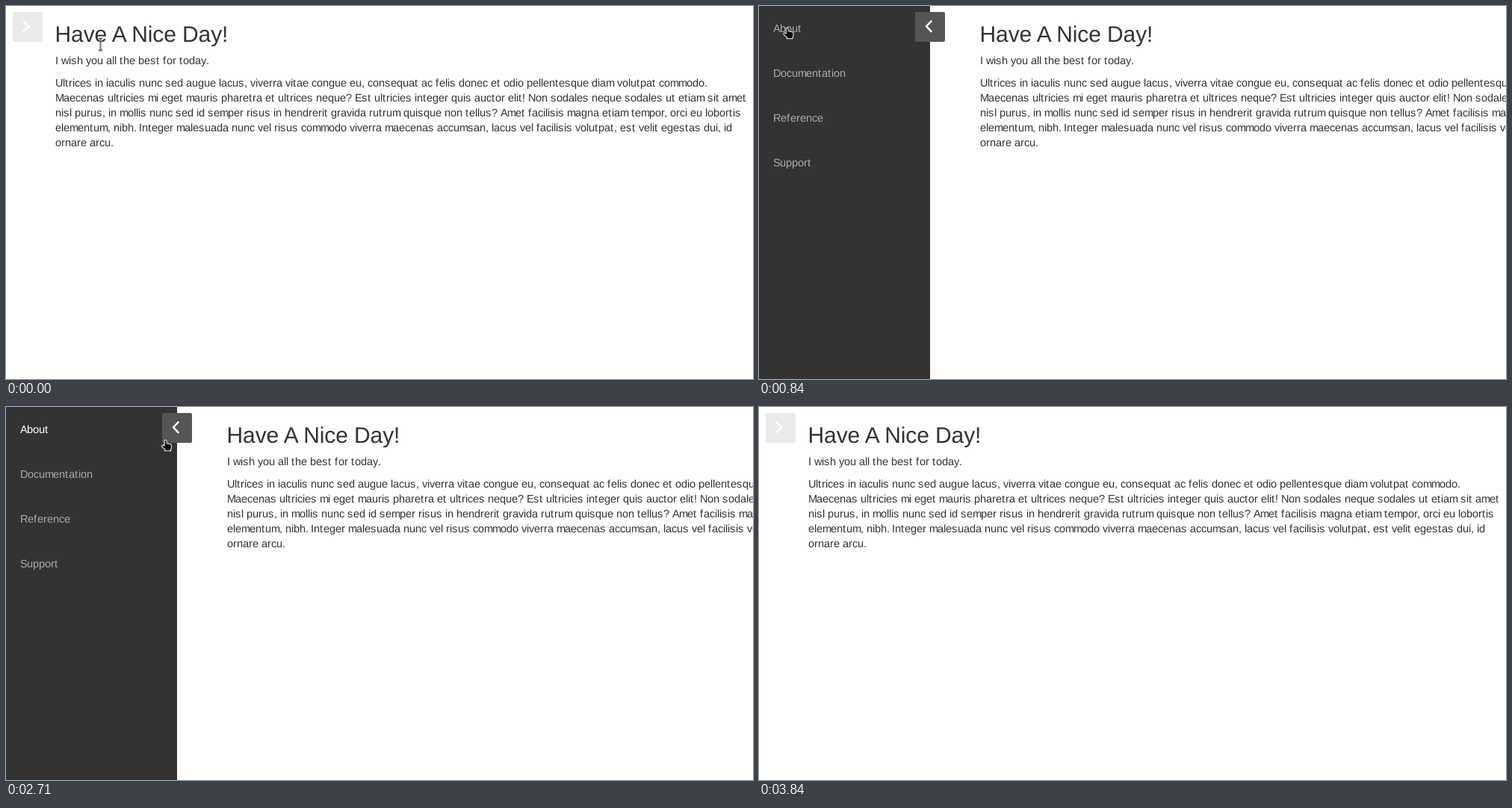
An HTML page that plays this animation: 1000x500 px, repeating every 4750 ms.

```html
<!DOCTYPE html>
<html lang="en">
<head>
<meta charset="utf-8">
<title>Sliding sidebar</title>
<style>
  html, body { margin: 0; width: 100%; height: 100%; overflow: hidden; background: #fff; }
  svg { display: block; width: 1000px; height: 500px; }
  text { font: 14.6px "Liberation Sans", Arial, sans-serif; fill: #333; text-rendering: geometricPrecision; }
  .title { font-size: 30px; letter-spacing: -.1px; }
  .menu text { fill: #aaa; }

  .page, .menu, .toggle, .plate, .chev, .menu text, .cursor, .cursor g {
    animation: 4.75s linear infinite;
  }
  .page { animation-name: page; animation-timing-function: step-end; }
  .menu { animation-name: menu; }
  .toggle { animation-name: toggle; }
  .plate { animation-name: plate; }
  .chev { fill: none; stroke: #fff; stroke-width: 2.4; animation-timing-function: step-end; }
  .chev.right { animation-name: closed; }
  .chev.left { animation-name: opened; }
  .menu .about { animation-name: about; }
  .menu .docs { animation-name: docs; }
  .menu .ref { animation-name: ref; }
  .menu .support { animation-name: support; }
  .cursor { animation-name: travel; }
  .cursor g { animation-timing-function: step-end; }
  .cursor .beam { animation-name: beam; }
  .cursor .hand { animation-name: hand; }
  .cursor .arrow { animation-name: arrow; }

  @keyframes page {
    0%, 65.47% { transform: translateX(0); }
    11.367% { transform: translateX(230px); }
  }
  @keyframes menu {
    0%, 69.16%, 100% { transform: translateX(-229px); }
    11.5% { transform: translateX(-229px); animation-timing-function: ease; }
    15.18% { transform: translateX(0); }
    65.47% { transform: translateX(0); animation-timing-function: ease; }
  }
  @keyframes toggle {
    0%, 65.47%, 100% { transform: translateX(0); }
    11.5% { transform: translateX(0); animation-timing-function: ease; }
    15.18%, 65.469% { transform: translateX(200px); }
  }
  @keyframes plate {
    0%, 2.9%, 65.47%, 100% { fill: #eaeaea; }
    5.6%, 11.5% { fill: #777; }
    15.18%, 65.469% { fill: #555; }
  }
  @keyframes closed {
    0%, 65.47% { opacity: 1; }
    11.367% { opacity: 0; }
  }
  @keyframes opened {
    0%, 65.47% { opacity: 0; }
    11.367% { opacity: 1; }
  }

  @keyframes about {
    0%, 22.5%, 26%, 46.3%, 61%, 100% { fill: #aaa; }
    23.5%, 24.5%, 47.5%, 58.9% { fill: #fff; }
  }
  @keyframes docs {
    0%, 24.5%, 28.5%, 44.2%, 47.8%, 100% { fill: #aaa; }
    25.5%, 27%, 45%, 46.3% { fill: #fff; }
  }
  @keyframes ref {
    0%, 27.2%, 31.5%, 41.5%, 45.5%, 100% { fill: #aaa; }
    28.2%, 30%, 42.5%, 44.2% { fill: #fff; }
  }
  @keyframes support {
    0%, 31.5%, 43%, 100% { fill: #aaa; }
    35%, 41.4% { fill: #fff; }
  }

  @keyframes travel {
    0%, .4% { transform: translate(126.5px, 51.5px); }
    3.6%, 22.5% { transform: translate(37.5px, 30px); }
    27.5% { transform: translate(62px, 112px); }
    32.84%, 34.1% { transform: translate(86px, 191px); }
    36.42%, 39.58% { transform: translate(100px, 223px); }
    41.26% { transform: translate(112.5px, 155px); }
    45% { transform: translate(129px, 75px); }
    49.9%, 51.16% { transform: translate(124px, 44px); }
    57.05% { transform: translate(213px, 45px); }
    61.26%, 69.47% { transform: translate(226px, 43px); }
    75.79% { transform: translate(338px, 227px); }
    80%, 100% { transform: translate(931px, 465px); }
  }
  @keyframes beam {
    0%, 65.47% { opacity: 1; }
    2.9%, 74.6% { opacity: 0; }
  }
  @keyframes hand {
    0%, 65.47% { opacity: 0; }
    2.9% { opacity: 1; }
  }
  @keyframes arrow {
    0%, 80.84% { opacity: 0; }
    74.6% { opacity: 1; }
  }
</style>
</head>
<body>
<svg viewBox="0 0 1000 500">
  <g class="page">
    <text class="title" x="65.5" y="48">Have A Nice Day!</text>
    <text class="fit" x="66" y="78">I wish you all the best for today.</text>
    <text class="fit" x="66" y="108">Ultrices in iaculis nunc sed augue lacus, viverra vitae congue eu, consequat ac felis donec et odio pellentesque diam volutpat commodo.</text>
    <text class="fit" x="66" y="128">Maecenas ultricies mi eget mauris pharetra et ultrices neque? Est ultricies integer quis auctor elit! Non sodales neque sodales ut etiam sit amet</text>
    <text class="fit" x="66" y="148">nisl purus, in mollis nunc sed id semper risus in hendrerit gravida rutrum quisque non tellus? Amet facilisis magna etiam tempor, orci eu lobortis</text>
    <text class="fit" x="66" y="168">elementum, nibh. Integer malesuada nunc vel risus commodo viverra maecenas accumsan, lacus vel facilisis volutpat, est velit egestas dui, id</text>
    <text class="fit" x="66" y="188">ornare arcu.</text>
  </g>

  <g class="menu">
    <rect width="229" height="500" fill="#333"/>
    <text class="fit about" x="19" y="35">About</text>
    <text class="fit docs" x="19" y="95">Documentation</text>
    <text class="fit ref" x="19" y="155">Reference</text>
    <text class="fit support" x="19" y="215">Support</text>
  </g>

  <g class="toggle">
    <rect class="plate" x="9" y="8" width="40" height="40" rx="2"/>
    <path class="chev right" d="M23 20 L30.7 27.2 L23 34.4"/>
    <path class="chev left" d="M31.3 19.6 L24 27.2 L31.3 34.8"/>
  </g>

  <g class="cursor">
    <g class="beam" fill="none">
      <path d="M-3 -8 H-1 L0 -7 L1 -8 H3 M0 -7 V7 M-3 8 H-1 L0 7 L1 8 H3" stroke="#fff" stroke-width="2.6"/>
      <path d="M-3 -8 H-1 L0 -7 L1 -8 H3 M0 -7 V7 M-3 8 H-1 L0 7 L1 8 H3" stroke="#000" stroke-width="1.1"/>
    </g>
    <g class="hand">
      <path transform="translate(-5 -1.5)" d="M4 1.4 C5 .2 7 .8 7 2.2 V5.2 L11.5 6 Q13.4 6.6 13.4 8.6 V12 L12.4 13.4 V15.2 H4.6 V13.4 L.8 9.8 Q.2 7.4 2.4 7.6 L4 8.4 Z" stroke="#fff" stroke-width="1.1" stroke-linejoin="round"/>
    </g>
    <g class="arrow">
      <path d="M.5 .5 V14.5 L3.8 11.5 L6 16.8 L8.3 15.8 L6 10.7 H10.6 Z" stroke="#fff" stroke-width="1"/>
    </g>
  </g>
</svg>
<script>
  // Whole-pixel glyph advances, as on a hinted low-resolution screen.
  const pen = document.createElement('canvas').getContext('2d');
  pen.font = '140px "Liberation Sans", Arial, sans-serif';
  const hint = { s: 1, t: 1, f: 1, m: -1, M: -1, '.': -1, 'r,': -1 };

  for (const el of document.querySelectorAll('.fit')) {
    let x = +el.getAttribute('x');
    const chars = [...el.textContent];
    const stops = chars.map((ch, i) => {
      const at = x;
      const extra = hint[ch + chars[i + 1]] ?? hint[ch] ?? 0;
      x += Math.round(pen.measureText(ch).width / 10) + extra;
      return at;
    });
    el.setAttribute('x', stops.join(' '));
  }
</script>
</body>
</html>
```
